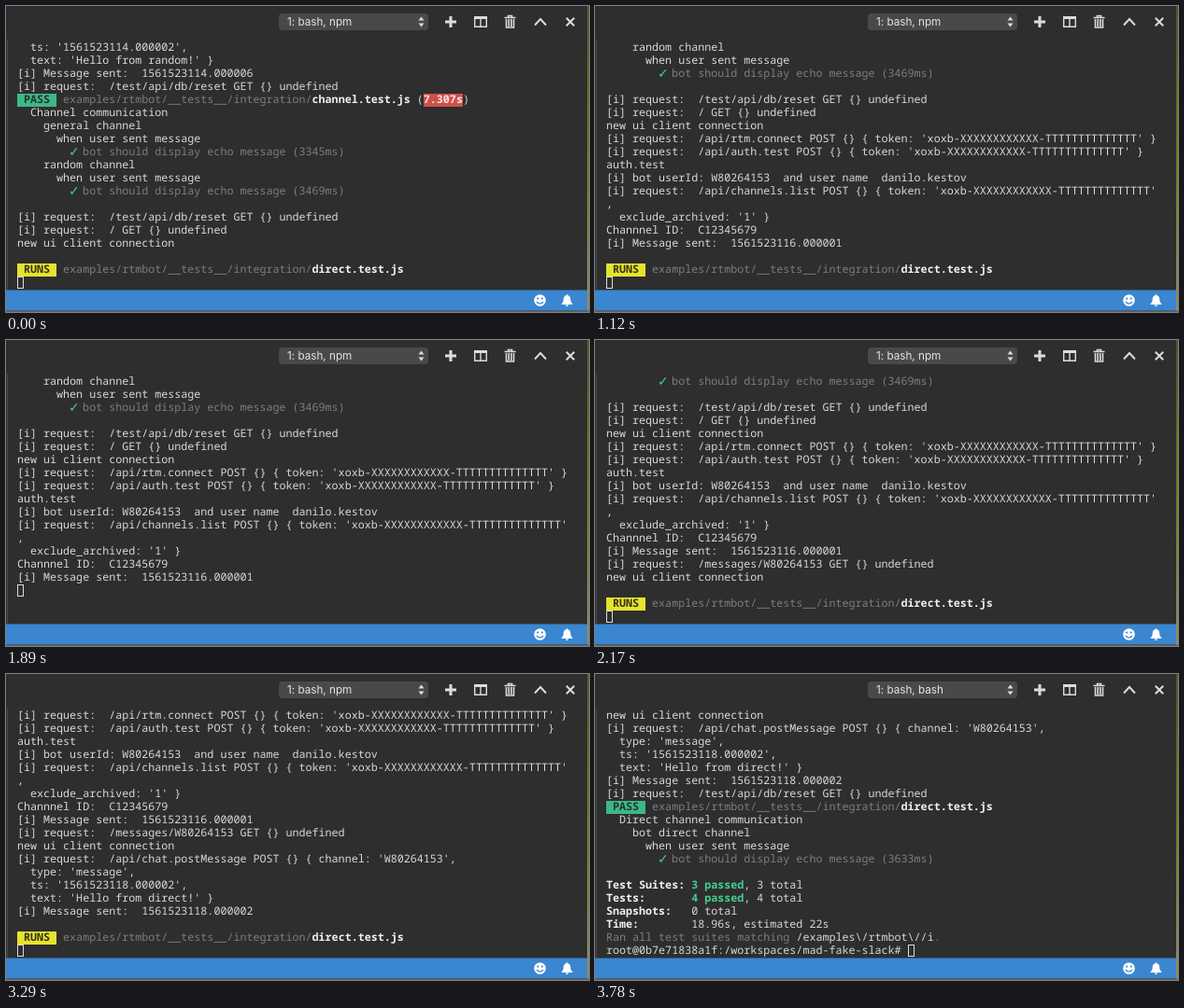
An HTML page for the animation above (4200 ms loop, 624x328 px).

```html
<!DOCTYPE html>
<html lang="en">
<head>
<meta charset="utf-8">
<title>Terminal test run</title>
<style>
  html, body { margin: 0; width: 100%; height: 100%; overflow: hidden; background: #2e2e2e; }
  #stage { position: relative; width: 624px; height: 328px; overflow: hidden; background: #2e2e2e; }
  #stage > svg { position: absolute; left: 0; top: 0; }
  #title {
    position: absolute; left: 301px; top: 9px; line-height: 16px; white-space: pre;
    font-family: Inter, Roboto, sans-serif; font-size: 11.7px; color: #e4e4e4;
  }
  #term {
    position: absolute; left: 12px; top: 38px; color: #d8d8d8;
    font: 11.69px/14px "Noto Sans Mono", "DejaVu Sans Mono", monospace;
    font-variant-ligatures: none; text-rendering: geometricPrecision;
  }
  #term div { height: 14px; white-space: pre; }
  #term b { font-weight: 700; color: #f0f0f0; }
  #term .dim { color: #7d7d7d; }
  #term .ok { color: #3fd292; }
  #term .tag { display: inline-block; height: 14px; vertical-align: top; color: #26322c; }
  #term .pass { background: #3cb887; }
  #term .runs { background: #e6e32d; color: #33331a; }
  #term .slow { background: #cf4f4a; color: #f4e6e4; }
  #term .tick {
    display: inline-block; width: 7px; height: 14px; vertical-align: top; text-indent: -1px;
    font-family: "DejaVu Sans", sans-serif; font-size: 14px; color: #3fd292;
  }
  #term .cur {
    display: inline-block; box-sizing: border-box; width: 7px; height: 13px;
    vertical-align: top; border: 1px solid #dcdcdc;
  }
</style>
</head>
<body>
<div id="stage">
  <svg width="624" height="328" viewBox="0 0 624 328">
    <defs>
      <linearGradient id="edge" x2="0" y2="1">
        <stop offset="0" stop-color="#55552c"/>
        <stop offset=".5" stop-color="#77771e"/>
        <stop offset="1" stop-color="#8c8c6c"/>
      </linearGradient>
    </defs>
    <path d="M1.5 36V304" stroke="#484848"/>
    <rect x="622" width="2" height="328" fill="url(#edge)"/>
    <rect y="304.500" width="622" height="22" fill="#3a86d0"/>
    <rect y="326.500" width="624" height="1.500" fill="#5c6266"/>

    <rect x="292" y="8" width="160" height="18" rx="4" fill="#494949"/>
    <path d="M441.500 15.500l3-4 3 4zM441.500 18.500l3 4 3-4z" fill="#dcdcdc"/>

    <g fill="none" stroke="#dcdcdc">
      <path d="M476 11v12M470 17h12" stroke-width="3"/>
      <path d="M501.700 11.700h12.600v10.600h-12.600zM508 12v10" stroke-width="1.400"/>
      <path d="M501 12.500h14" stroke-width="3"/>
      <path d="M533.500 12.500h12M537.500 12v-1.500h4v1.500" stroke-width="1.600"/>
      <path d="M535.500 14v9h8v-9M538.200 14v8M540.800 14v8" stroke-width="1.600"/>
      <path d="M566 20.500l6-6.500 6 6.500" stroke-width="1.900"/>
      <path d="M599.800 12.800l8.400 8.400M608.200 12.800l-8.400 8.400" stroke-width="2"/>
    </g>

    <circle cx="571.500" cy="315.500" r="6.300" fill="#fff"/>
    <g fill="#3a86d0">
      <circle cx="569.200" cy="313.600" r="1.100"/>
      <circle cx="573.800" cy="313.600" r="1.100"/>
    </g>
    <path d="M568 317q3.500 4.200 7 0" fill="none" stroke="#3a86d0" stroke-width="1.300"/>
    <path d="M600.500 309.300q1 0 1 1c2.600.8 2.800 3 2.900 5.400q.1 2 1.900 3.300v.9h-11.600v-.9q1.800-1.300 1.900-3.300c.1-2.400.3-4.600 2.900-5.400q0-1 1-1zM598.900 320.600h3.200q-.3 1.500-1.600 1.500t-1.600-1.500z" fill="#fff"/>
  </svg>
  <div id="title"></div>
  <div id="term"></div>
</div>
<script>
const LOOP = 4200, ROWS = 19;
const term = document.getElementById('term');
const title = document.getElementById('title');

const span = (cls, s) => `<span class="${cls}">${s}</span>`;
const bold = s => `<b>${s}</b>`;
const tag = (cls, s) => `<b class="tag ${cls}">${s}</b>`;
const file = name => ' ' + span('dim', 'examples/rtmbot/__tests__/integration/') + bold(name + '.test.js');
const req = s => '[i] request:  ' + s;
const sent = id => '[i] Message sent:  ' + id;
const echo = ms => '        ' + span('tick', '✓') + span('dim', ` bot should display echo message (${ms}ms)`);
const total = (name, n) => bold(name.padEnd(13)) + `<b class="ok">${n} passed</b>, ${n} total`;

const user = 'W80264153';
const token = `POST {} { token: 'xoxb-${'X'.repeat(12)}-${'T'.repeat(14)}'`;
const reset = req('/test/api/db/reset GET {} undefined');
const client = 'new ui client connection';
const when = '      when user sent message';
const cursor = span('cur', '');
const prompt = 'root@0b7e71838a1f:/workspaces/mad-fake-slack# ' + cursor;
const runs = ['', tag('runs', ' RUNS ') + file('direct'), cursor];

const log = [
  "  ts: '1561523114.000002',",
  "  text: 'Hello from random!' }",
  sent('1561523114.000006'),
  reset,
  tag('pass', ' PASS ') + file('channel') + ' (' + tag('slow', '7.307s') + ')',
  '  Channel communication',
  '    general channel',
  when,
  echo(3345),
  '    random channel',
  when,
  echo(3469),
  '',
  reset,
  req('/ GET {} undefined'),
  client,
  req(`/api/rtm.connect ${token} }`),
  req(`/api/auth.test ${token} }`),
  'auth.test',
  `[i] bot userId: ${user}  and user name  danilo.kestov`,
  req(`/api/channels.list ${token}`),
  ',',
  "  exclude_archived: '1' }",
  'Channnel ID:  C12345679',
  sent('1561523116.000001'),
  req(`/messages/${user} GET {} undefined`),
  client,
  req(`/api/chat.postMessage POST {} { channel: '${user}',`),
  "  type: 'message',",
  "  ts: '1561523118.000002',",
  "  text: 'Hello from direct!' }",
  sent('1561523118.000002'),
  reset,
  tag('pass', ' PASS ') + file('direct'),
  '  Direct channel communication',
  '    bot direct channel',
  when,
  echo(3633),
  '',
  total('Test Suites:', 3),
  total('Tests:', 4),
  bold('Snapshots:   ') + '0 total',
  bold('Time:        ') + '18.96s, estimated 22s',
  span('dim', 'Ran all test suites matching ') + '/examples\\/rtmbot\\//i' + span('dim', '.')
];

// start ms, log lines printed, lines after the log, first visible line, running job
const steps = [
  [0, 16, runs, 0, 'npm'],
  [910, 19, runs, 3, 'npm'],
  [980, 25, runs, 9, 'npm'],
  [1890, 25, [cursor], 9, 'npm'],
  [1960, 27, runs, 11, 'npm'],
  [2240, 32, runs, 16, 'npm'],
  [3360, 33, runs, 17, 'npm'],
  [3430, 44, [cursor], 26, 'npm'],
  [3500, 44, [prompt], 26, 'bash']
];

let shown = null;
function draw(step) {
  if (step === shown) return;
  shown = step;
  const [, count, tail, top, job] = step;
  const lines = log.slice(0, count).concat(tail).slice(top, top + ROWS);
  term.innerHTML = lines.map(s => `<div>${s}</div>`).join('');
  title.textContent = '1: bash, ' + job;
}

const start = performance.now();
function tick() {
  const t = (performance.now() - start) % LOOP;
  draw(steps.filter(s => s[0] <= t).pop());
  requestAnimationFrame(tick);
}
tick();
</script>
</body>
</html>
```
